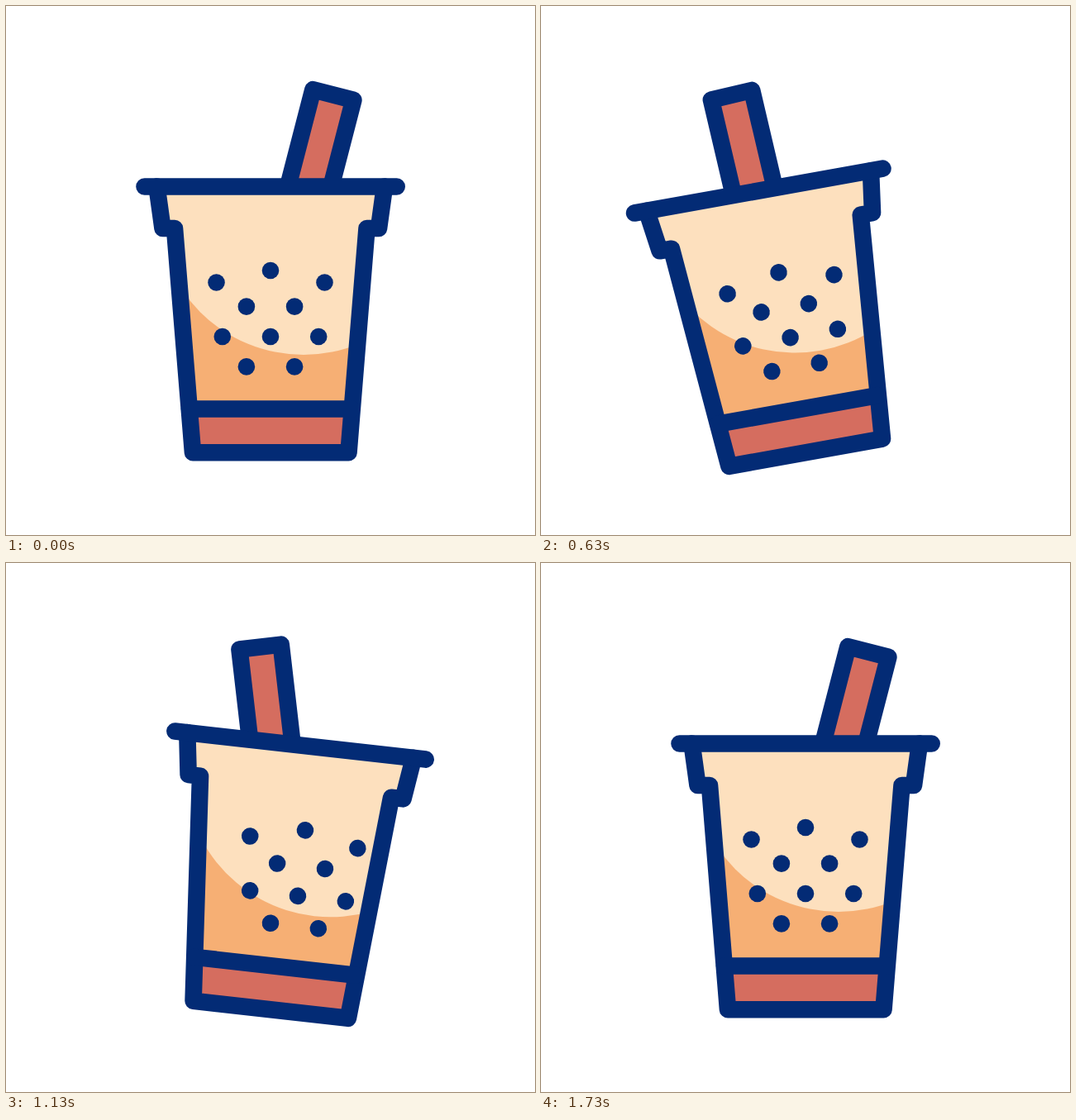
These frames come from a looping animation (640 px wide and 640 px high, 2000 ms). An HTML page:

```html
<!DOCTYPE html>
<html lang="en">
<head>
<meta charset="utf-8">
<title>Bubble tea</title>
<style>
  html, body { margin: 0; width: 100%; height: 100%; overflow: hidden; background: #fff; }
  svg { display: block; width: 100%; height: 100%; }
  .line { stroke: #032b75; stroke-width: 20.6; stroke-linecap: round; stroke-linejoin: round; }
  .none { fill: none; }
  .red { fill: #d56d5f; }
  .milk { fill: #fde0be; }
  .tea { fill: #f6af74; }
  #pearls { fill: #032b75; }
</style>
</head>
<body>
<svg viewBox="0 0 640 640">
  <defs>
    <path id="shape" d="M182.5 218.5 189.5 269H204L226 540.3H414.5L436.5 269H451L458 218.5"/>
    <clipPath id="inside"><use href="#shape"/></clipPath>
  </defs>
  <g id="cup">
    <g id="straw"><rect class="line red" x="-25.3" y="-288.7" width="50.6" height="288.7"/></g>
    <g clip-path="url(#inside)">
      <rect class="tea" x="160" y="218" width="320" height="270"/>
      <circle class="milk" cx="360" cy="245" r="177"/>
      <rect class="red" x="200" y="488" width="240" height="53"/>
      <g id="pearls"></g>
    </g>
    <use href="#shape" class="line none"/>
    <path class="line none" d="M222 487.5H418M167.5 218.5H472.7"/>
  </g>
</svg>
<script>
  const FPS = 30, LOOP = 2000, FIRST = 0.35, LAST = 51.6;
  const el = id => document.getElementById(id);
  const cup = el('cup'), straw = el('straw'), pearls = el('pearls');

  // Each part swings from rest through [step, value] extremes and back to rest.
  const track = (...peaks) => [[FIRST, 0], ...peaks, [LAST, 0]];
  const tilt = track([10, 15], [20.7, -12], [30.4, 9.45], [42.3, -4.4]);
  const swing = track([14, -35.7], [24.6, 4], [34, -27.5]);
  const slosh = track([12, 60], [25, -36], [36.2, 23.4]);

  function valueAt(keys, step) {
    const i = keys.findIndex(k => k[0] > step);
    if (i < 1) return 0;
    const [t0, a] = keys[i - 1], [t1, b] = keys[i];
    const u = (step - t0) / (t1 - t0);
    return a + (b - a) * u * u * (3 - 2 * u);
  }

  // Pearls sit on a grid, mirrored about the middle of the cup.
  const GRID = 14.55;
  function addPearl(x, y) {
    const dot = document.createElementNS('http://www.w3.org/2000/svg', 'circle');
    dot.setAttribute('cx', 320 + x * GRID);
    dot.setAttribute('cy', 320 + y * GRID);
    dot.setAttribute('r', 10.3);
    pearls.append(dot);
  }
  for (const y of [0, 5.5]) addPearl(0, y);
  for (const side of [-1, 1]) {
    for (const [x, y] of [[4.5, 1], [2, 3], [4, 5.5], [2, 8]]) addPearl(side * x, y);
  }

  function draw(ms) {
    // Held steps, with their starts rounded to 10 ms.
    const step = Math.floor((ms % LOOP + 3.4) * FPS / 1000);
    cup.setAttribute('transform', `rotate(${valueAt(tilt, step)} 320 540.3)`);
    straw.setAttribute('transform', `translate(323.6 387) rotate(${14.5 + valueAt(swing, step)})`);
    pearls.setAttribute('transform', `translate(${valueAt(slosh, step)} 0)`);
  }

  const start = performance.now();
  function tick() {
    draw(performance.now() - start);
    requestAnimationFrame(tick);
  }
  tick();
</script>
</body>
</html>
```
